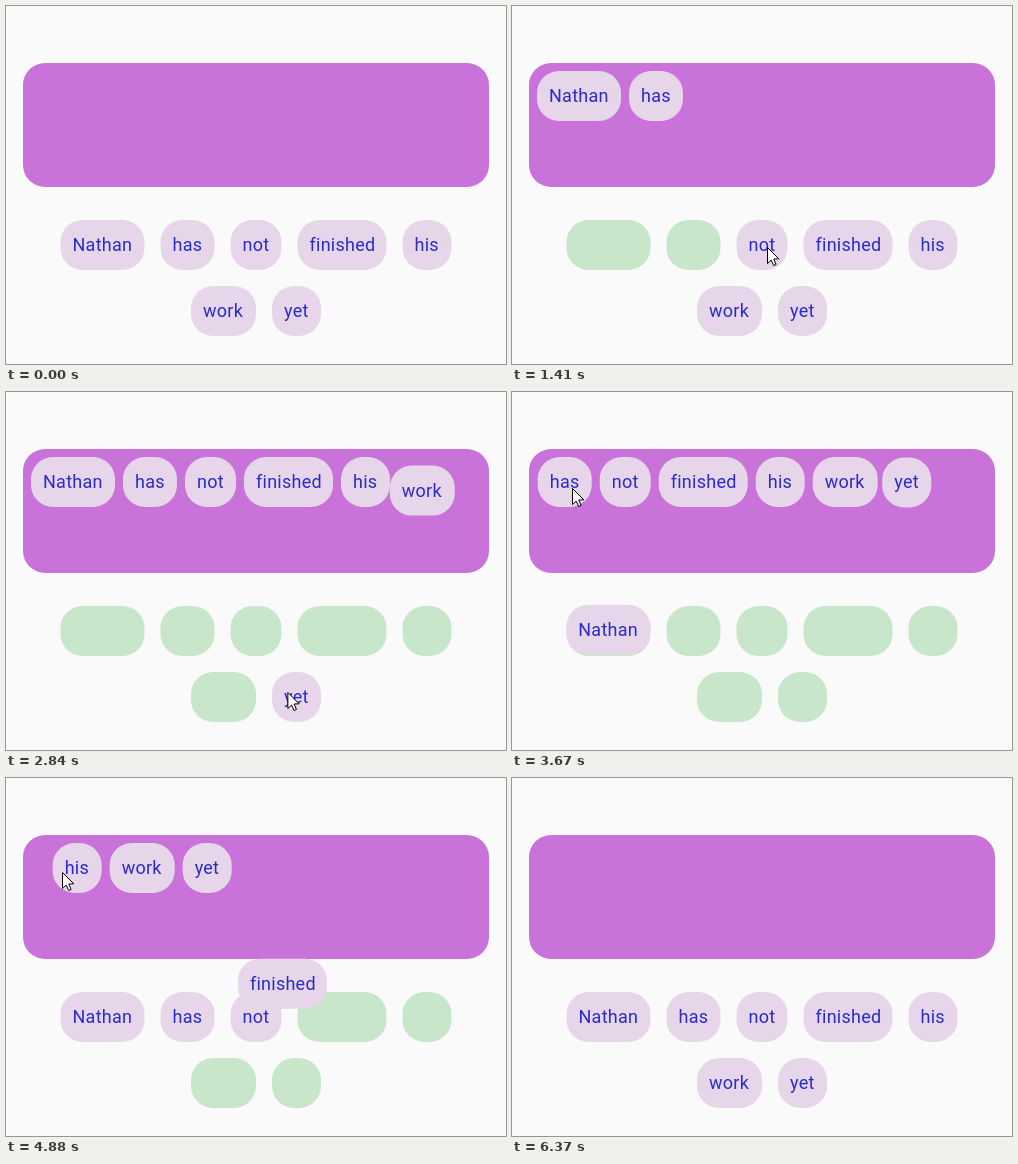
An HTML page with a canvas that plays this animation: 500 by 358 pixels, repeating every 7.11 s.

```html
<!DOCTYPE html>
<html lang="en">
<head>
<meta charset="utf-8">
<title>Word order</title>
<style>
  html, body { margin: 0; width: 100%; height: 100%; overflow: hidden; background: #fafafa; }
  canvas { display: block; width: 500px; height: 358px; }
</style>
</head>
<body>
<canvas id="stage" width="500" height="358"></canvas>
<script>
const ctx = document.getElementById('stage').getContext('2d');
const LOOP = 7110, FLIGHT = 220, HEIGHT = 50, GAP = 8, PAD = 12, RADIUS = 22;
const LEFT = 25, RIGHT = 475, TOP = 65;

const chips = Object.entries({ Nathan: 84, has: 54, not: 51, finished: 89, his: 49, work: 65, yet: 49 })
  .map(([word, width]) => ({ word, width }));

// The words are tapped in order twice: first up into the box, then back home.
const taps = [795, 1175, 1490, 1845, 2205, 2652, 2945, 3465, 3918, 4325, 4733, 5085, 5466, 5885];

// The pointer walks through these stops, leaving each one shortly after a tap.
const stops = [
  [110, 237], [196, 247], [255, 241], [350, 245], [445, 247],
  [220, 300], [282, 300], [60, 96], [60, 96], [56, 94]
];
const ENTRY = [409, 360], EXIT = [190, 362], HOP_DELAY = 50, HOP = 150;

const hops = [
  { start: 180, length: 410, to: stops[0] },
  ...stops.slice(1).map((to, n) => ({ start: taps[n] + HOP_DELAY, length: HOP, to })),
  { start: 6110, length: 260, to: EXIT }
];

const homes = [...centerRow(chips.slice(0, 5), 214), ...centerRow(chips.slice(5), 280)];

function centerRow(row, y) {
  const total = row.reduce((sum, c) => sum + c.width + 2 * GAP, -2 * GAP);
  let x = 250 - total / 2;
  return row.map(c => {
    const spot = { x, y };
    x += c.width + 2 * GAP;
    return spot;
  });
}

function layout(answer) {
  const spots = homes.slice();
  let x = LEFT, y = TOP;
  for (const i of answer) {
    const { width } = chips[i];
    if (x + width > RIGHT) { x = LEFT; y += HEIGHT + GAP; }
    spots[i] = { x, y };
    x += width + GAP;
  }
  return spots;
}

// cubic-bezier(.42, 0, .58, 1)
function ease(x) {
  if (x <= 0) return 0;
  if (x >= 1) return 1;
  let lo = 0, hi = 1, s = 0.5;
  for (let k = 0; k < 24; k++) {
    s = (lo + hi) / 2;
    const bx = 1.26 * s * (1 - s) * (1 - s) + 1.74 * s * s * (1 - s) + s * s * s;
    if (bx < x) lo = s; else hi = s;
  }
  return s * s * (3 - 2 * s);
}

const mix = (a, b, p) => p >= 1 ? b : a + (b - a) * p;

function chipsAt(t) {
  let spots = homes, answer = [], flying = -1;
  taps.filter(start => start < t).forEach((start, n) => {
    flying = n % chips.length;
    answer = n < chips.length ? [...answer, flying] : answer.slice(1);
    const p = ease((t - start) / FLIGHT);
    const goal = layout(answer);
    spots = spots.map((s, i) => ({ x: mix(s.x, goal[i].x, p), y: mix(s.y, goal[i].y, p) }));
  });
  return { spots, flying };
}

function pill(x, y, w, h, color) {
  ctx.fillStyle = color;
  ctx.beginPath();
  ctx.roundRect(x, y, w, h, RADIUS);
  ctx.fill();
}

function drawChip({ word, width }, { x, y }) {
  pill(x, y, width, HEIGHT, '#e7d6e9');
  ctx.fillStyle = '#2a2bc8';
  ctx.fillText(word, x + PAD, y + 31);
}

function drawPointer(t) {
  if (t < hops[0].start) return;
  let [x, y] = ENTRY;
  for (const { start, length, to } of hops) {
    const p = ease((t - start) / length);
    x = mix(x, to[0], p);
    y = mix(y, to[1], p);
  }
  if (y > 358) return;
  ctx.save();
  ctx.translate(x + 0.5, y + 0.5);
  ctx.beginPath();
  [[0, 0], [0, 16], [3.7, 12.6], [6.2, 18], [8.6, 17], [6.3, 11.5], [11.3, 11.3]]
    .forEach(([px, py]) => ctx.lineTo(px, py));
  ctx.closePath();
  ctx.fillStyle = '#fff';
  ctx.fill();
  ctx.strokeStyle = '#000';
  ctx.lineWidth = 1;
  ctx.stroke();
  ctx.restore();
}

function draw(t) {
  ctx.fillStyle = '#fafafa';
  ctx.fillRect(0, 0, 500, 358);
  pill(17, 57, 466, 124, '#c973da');

  ctx.font = '18px Roboto, sans-serif';
  ctx.letterSpacing = '0.25px';
  const { spots, flying } = chipsAt(t);
  homes.forEach((home, i) => {
    const away = spots[i].x !== home.x || spots[i].y !== home.y;
    if (away) pill(home.x, home.y, chips[i].width, HEIGHT, '#c8e6c9');
  });
  chips.forEach((chip, i) => { if (i !== flying) drawChip(chip, spots[i]); });
  if (flying >= 0) drawChip(chips[flying], spots[flying]);
  drawPointer(t);
}

const begin = performance.now();
function frame() {
  draw((performance.now() - begin) % LOOP);
  requestAnimationFrame(frame);
}
frame();
</script>
</body>
</html>
```
